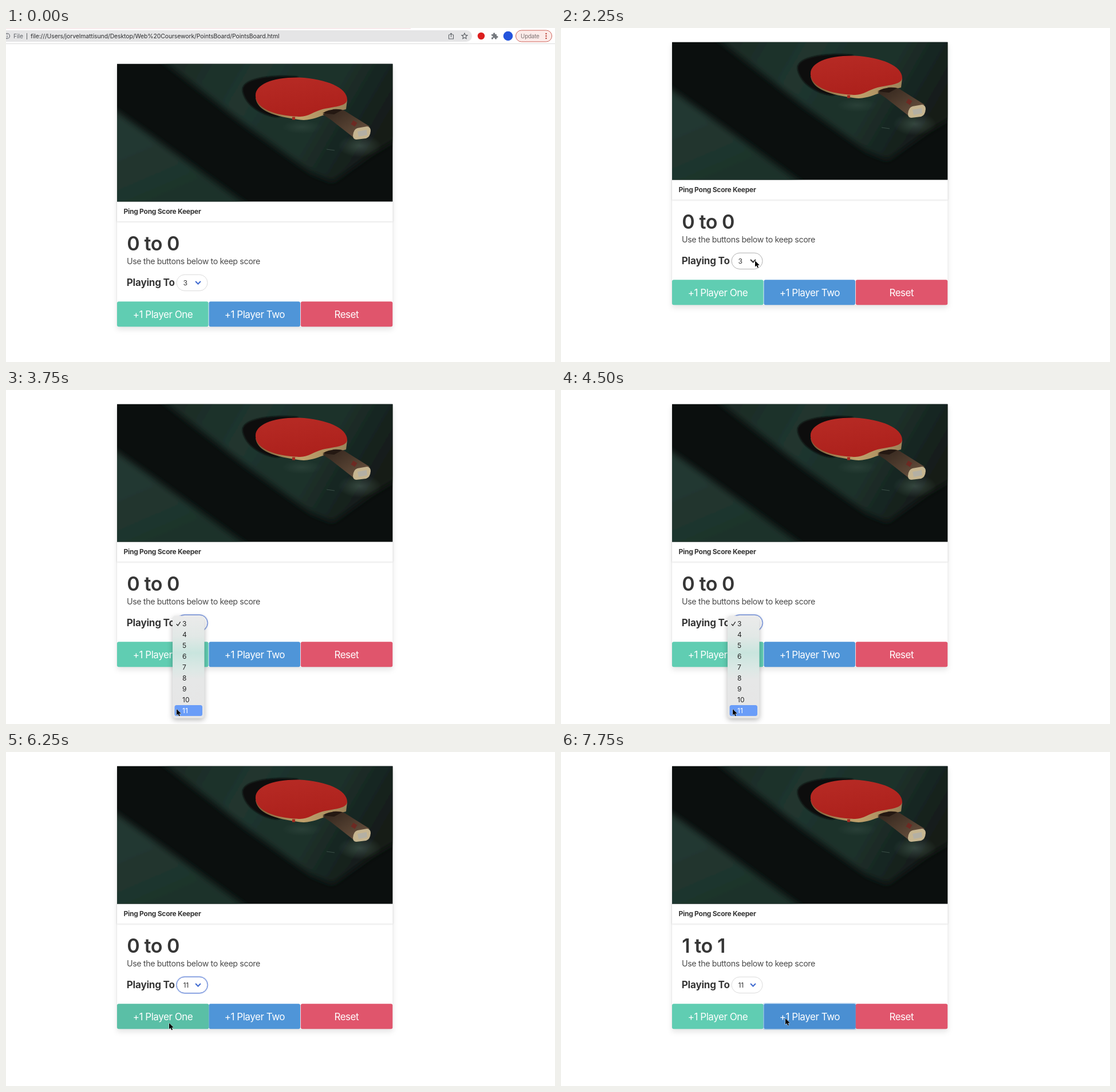
An HTML page that plays this animation: 959x584 px, repeating every 8000 ms.

```html
<!DOCTYPE html>
<html lang="en">
<head>
<meta charset="utf-8">
<title>Ping Pong Score Keeper</title>
<style>
  html, body { margin: 0; width: 100%; height: 100%; overflow: hidden; background: #fff; }
  svg { display: block; width: 959px; height: 584px; }
  text { font-family: Inter, Roboto, sans-serif; fill: #363636; white-space: pre; }
  .card { fill: #fff; filter: drop-shadow(0 5px 5px rgba(10,10,10,.11)); }
  .head { fill: #fff; filter: drop-shadow(0 1.5px 1.5px rgba(10,10,10,.13)); }
  .title { font-size: 12px; font-weight: 700; letter-spacing: -.26px; }
  .score { font-size: 34px; font-weight: 600; letter-spacing: -.4px; }
  .sub { font-size: 14.2px; letter-spacing: -.36px; fill: #4a4a4a; }
  .label { font-size: 17px; font-weight: 700; letter-spacing: -.2px; }
  .num { font-size: 12.2px; letter-spacing: -.2px; }
  .btn text { font-size: 17px; letter-spacing: -.45px; fill: #fff; text-anchor: middle; }
  .sheet { filter: drop-shadow(0 3px 5px rgba(0,0,0,.28)); }
  #items text { font-size: 12px; }
  .url { font-size: 10.4px; letter-spacing: -.07px; fill: #2b2c2e; }
</style>
</head>
<body>
<svg viewBox="0 0 959 584">
  <defs>
    <clipPath id="frame"><rect x="194" y="24.7" width="481.4" height="240.8"/></clipPath>
    <filter id="soft" x="-20%" y="-20%" width="140%" height="140%"><feGaussianBlur stdDeviation="6"/></filter>
    <filter id="edge"><feGaussianBlur stdDeviation="1"/></filter>
    <linearGradient id="felt" x1="0" y1="0" x2="1" y2=".3">
      <stop offset="0" stop-color="#182823"/><stop offset=".4" stop-color="#20352e"/>
      <stop offset=".75" stop-color="#1d302a"/><stop offset="1" stop-color="#121c19"/>
    </linearGradient>
    <linearGradient id="felt2" x1="0" y1="0" x2=".6" y2="1">
      <stop offset="0" stop-color="#263a34"/><stop offset="1" stop-color="#1c322a"/>
    </linearGradient>
    <linearGradient id="rubber" x1="0" y1="0" x2=".3" y2="1">
      <stop offset="0" stop-color="#b72b25"/><stop offset="1" stop-color="#ad211c"/>
    </linearGradient>
    <linearGradient id="rim" x1="0" y1="0" x2="1" y2="0">
      <stop offset="0" stop-color="#7d5a35"/><stop offset=".5" stop-color="#c0a26c"/><stop offset="1" stop-color="#9c835a"/>
    </linearGradient>
    <linearGradient id="wood" x1="0" y1="0" x2="1" y2="1">
      <stop offset="0" stop-color="#2f231b"/><stop offset=".5" stop-color="#4f3c2e"/><stop offset="1" stop-color="#6f5743"/>
    </linearGradient>
    <radialGradient id="glow">
      <stop offset="0" stop-color="#496056" stop-opacity=".6"/><stop offset="1" stop-color="#496056" stop-opacity="0"/>
    </radialGradient>
    <linearGradient id="glass" x1="0" y1="0" x2="0" y2="1">
      <stop offset="0" stop-color="#ebebeb"/><stop offset=".2" stop-color="#e2e8e6"/>
      <stop offset=".36" stop-color="#c9e5de"/><stop offset=".52" stop-color="#dce8e5"/>
      <stop offset=".62" stop-color="#e6e7e7"/><stop offset="1" stop-color="#e6e6e6"/>
    </linearGradient>
  </defs>
  <rect width="959" height="584" fill="#fff"/>

  <g id="bar">
    <rect width="707" height="1" fill="#f3d9dd"/>
    <rect y="27" width="959" height="1" fill="#dcdcdc"/>
    <rect x="-20" y="4" width="834" height="20" rx="10" fill="#e5e5e6"/>
    <g fill="none" stroke="#5f6368" stroke-width="1.1">
      <circle cx="2" cy="14" r="4.5"/>
      <path d="M2 13.5V17M2 11V12.2M36.5 9V20" stroke-width="1"/>
      <path d="M775 12H773.5V19H781.5V12H780M777.5 16V9.5M775.2 11.6 777.5 9.2 779.8 11.6"/>
      <path d="M801 9 802.5 12.4 806 12.7 803.3 15 804.1 18.6 801 16.7 797.9 18.6 798.7 15 796 12.7 799.5 12.4Z"/>
    </g>
    <text x="13" y="17.7" class="url" style="fill:#5f6368">File</text>
    <text x="43" y="17.7" class="url">file:///Users/jorvelmattisund/Desktop/Web%20Coursework/PointsBoard/PointsBoard.html</text>
    <circle cx="830" cy="14" r="6.2" fill="#dc1f1f"/>
    <path d="M848 11H851V10A1.7 1.7 0 0 1 854.4 10V11H857V14H858A1.6 1.6 0 0 1 858 17.2H857V19.5H854V18.4A1.5 1.5 0 0 0 851 18.4V19.5H848V16.6H849A1.5 1.5 0 0 0 849 13.6H848Z" fill="#777b80"/>
    <circle cx="877" cy="14" r="8.3" fill="#2454dc"/>
    <rect x="890.5" y="4" width="63" height="20" rx="10" fill="#fcebe9" stroke="#cf6359"/>
    <text x="899" y="17.6" style="font-size:9.9px;letter-spacing:-.2px;fill:#7c7071">Update</text>
    <g fill="#b8372d"><circle cx="943.5" cy="10" r="1.2"/><circle cx="943.5" cy="14" r="1.2"/><circle cx="943.5" cy="18" r="1.2"/></g>
  </g>

  <g id="page">
    <rect class="card" x="194" y="25" width="481.4" height="459" rx="3"/>
    <rect x="193.5" y="25" width="482.4" height="459" rx="3" fill="none" stroke="#0a0a0a" stroke-opacity=".03"/>
    <rect class="head" x="194" y="264" width="481.4" height="36"/>

    <g clip-path="url(#frame)">
      <rect x="194" y="24" width="482" height="242" fill="#0b0f0e"/>
      <g filter="url(#soft)">
        <path d="M262 10H690V152L640 182 570 231 535 216 425 137Z" fill="url(#felt)"/>
        <path d="M175 95 255 152 330 206 425 275H175Z" fill="url(#felt2)"/>
      </g>
      <ellipse cx="618" cy="168" rx="38" ry="20" fill="url(#glow)"/>
      <ellipse cx="517" cy="135" rx="35" ry="12" fill="url(#glow)" opacity=".5"/>
      <path d="M560 174 574 176" stroke="#4a6156" stroke-width=".7"/>
      <path d="M510 47C455 42 411 52 413 71C416 95 445 116 475 118L520 100Z" fill="#080b0a" filter="url(#edge)"/>
      <path d="M436 84C438 103 460 117 520 123C538 122 545 117 560 113L594 104 596 88Z" fill="url(#rim)"/>
      <path d="M436 82C434 62 462 48 512 48.5C561 51 597 67 596 88C594 98 578 99 553 104C538 108 528 117 514 117C470 116 438 103 436 82Z" fill="url(#rubber)"/>
      <rect x="500" y="117.5" width="5" height="5" fill="#a62a20"/>
      <path d="M553 113 572 104Q583 103 592 107L635 134 609 155 567 122Z" fill="url(#wood)"/>
      <path d="M553 111Q565 102 588 105L573 113Z" fill="#241812"/>
      <rect x="604" y="125" width="8" height="8" transform="rotate(31 608 129)" fill="#6d2a23"/>
      <path d="M606 150Q607 139 614 137L631 134Q637 135 637 142Q636 153 629 155L612 157Q606 157 606 150Z" fill="#c6b590"/>
      <path d="M614 143 630 140 631 149 616 152Z" fill="#b4b0a4"/>
    </g>

    <text class="title" x="205.5" y="287.3">Ping Pong Score Keeper</text>
    <text class="score" id="score" x="211.2" y="351"></text>
    <text class="sub" x="211" y="375">Use the buttons below to keep score</text>
    <text class="label" x="210.8" y="413">Playing To</text>
    <rect id="ring" x="296.5" y="391.8" width="57" height="31.2" rx="15.6" fill="#4a74d8" fill-opacity=".3"/>
    <rect id="box" x="298" y="393.3" width="54" height="28.2" rx="14.1" fill="#fff"/>
    <text class="num" id="goal" x="309.5" y="412.3"></text>
    <path id="arrow" d="M331.6 405.6 335.5 409.5 339.4 405.6" fill="none" stroke-width="2.1" stroke-linecap="round"/>
    <g id="buttons"></g>
  </g>

  <g id="popup">
    <rect class="sheet" x="291" y="395" width="55.5" height="179" rx="5" fill="url(#glass)"/>
    <rect id="mark" x="294.5" width="48.5" height="19" rx="3.5" fill="#6a9df8"/>
    <g id="items"></g>
    <path id="tick" d="M297.8 409.3 300.2 412 304.6 405.3" fill="none" stroke-width="1.3"/>
  </g>

  <path id="cursor" d="M0 0V10.6L2.5 8.3 4.2 12.2 6 11.4 4.3 7.7H7.8Z" fill="#000" stroke="#fff" stroke-width="1" paint-order="stroke"/>
</svg>
<script>
const NS = 'http://www.w3.org/2000/svg';
const $ = id => document.getElementById(id);
const LOOP = 8000;

function add(parent, tag, attrs, text = '') {
  const el = document.createElementNS(NS, tag);
  for (const key in attrs) el.setAttribute(key, attrs[key]);
  el.textContent = text;
  return parent.appendChild(el);
}
const show = (el, on) => el.setAttribute('visibility', on ? 'visible' : 'hidden');

// label, fill, hover fill
const buttons = [
  ['+1 Player One', '#60cdb2', '#5abfa6'],
  ['+1 Player Two', '#4f95d8', '#4a8fd2'],
  ['Reset', '#e0556c', '#d94f66']
].map(([label, fill, hover], i) => {
  const x = 194 + 160.4 * i;
  const g = add($('buttons'), 'g', { class: 'btn' });
  const ring = add(g, 'rect', { x: x - 1.7, y: 438.5, width: 164, height: 47.6, rx: 4, fill, 'fill-opacity': .3 });
  const face = add(g, 'rect', { x, y: 440.2, height: 44, rx: 3 });
  add(g, 'text', { x: x + 80, y: 469 }, label);
  return { fill, hover, ring, face };
});

const items = Array.from({ length: 9 }, (_, i) =>
  add($('items'), 'text', { x: 308, y: 412.7 + 19 * i }, i + 3));

// Each step keeps whatever it does not change.
const steps = [
  { t: 0, x: -50, y: -50, scroll: 38, score: '0 to 0', goal: 3, select: 'idle', item: -1, hover: -1, focus: -1 },
  { t: 500, x: 349, y: 374, scroll: 0 },
  { t: 750, x: 349, y: 376 },
  { t: 1000, x: 348, y: 379 },
  { t: 1250, x: 347, y: 382 },
  { t: 1500, x: 346, y: 384 },
  { t: 2000, x: 342, y: 397, select: 'hover' },
  { t: 2250, x: 339, y: 407 },
  { t: 2500, select: 'focus', item: 0 },
  { t: 2750, x: 332, y: 417, item: 1 },
  { t: 3000, x: 326, y: 432 },
  { t: 3500, x: 308, y: 508, item: 5 },
  { t: 3750, x: 298, y: 558, item: 8 },
  { t: 4250, x: 299, y: 559 },
  { t: 4500, x: 300, y: 558 },
  { t: 4750, x: 305, y: 528, goal: 11, item: -1 },
  { t: 5000, x: 302, y: 512 },
  { t: 5250, x: 295, y: 492 },
  { t: 5500, x: 288, y: 478, hover: 0 },
  { t: 5750, x: 285, y: 474 },
  { t: 6500, score: '1 to 0', select: 'idle', focus: 0 },
  { t: 7250, x: 325, y: 471 },
  { t: 7500, x: 382, y: 467, hover: 1 },
  { t: 7750, x: 392, y: 466, score: '1 to 1', focus: 1 }
];
for (let i = 1; i < steps.length; i++) steps[i] = { ...steps[i - 1], ...steps[i] };

const borders = { idle: '#dbdbdb', hover: '#b0b0b0', focus: '#5578d2' };

function draw(s) {
  show($('bar'), s.scroll > 0);
  $('page').setAttribute('transform', `translate(0 ${s.scroll})`);
  $('cursor').setAttribute('transform', `translate(${s.x} ${s.y})`);
  $('score').textContent = s.score;
  $('goal').textContent = s.goal;
  show($('ring'), s.select === 'focus');
  $('box').setAttribute('stroke', borders[s.select]);
  $('arrow').setAttribute('stroke', s.select === 'hover' ? '#363636' : '#416bd0');

  show($('popup'), s.item >= 0);
  $('mark').setAttribute('y', 399 + 19 * s.item);
  items.forEach((el, i) => { el.style.fill = i === s.item ? '#fff' : '#222'; });
  $('tick').setAttribute('stroke', s.item === 0 ? '#fff' : '#222');

  buttons.forEach((b, i) => {
    const wide = i === s.hover || i === s.focus || i === 2;
    show(b.ring, i === s.focus);
    b.face.setAttribute('fill', i === s.hover ? b.hover : b.fill);
    b.face.setAttribute('width', wide ? 160.5 : 159.6);
  });
}

const start = performance.now();
let last;
function tick() {
  const t = (performance.now() - start) % LOOP;
  const now = steps.findLast(s => s.t <= t) || steps[0];
  if (now !== last) draw(last = now);
  requestAnimationFrame(tick);
}
tick();
</script>
</body>
</html>
```
